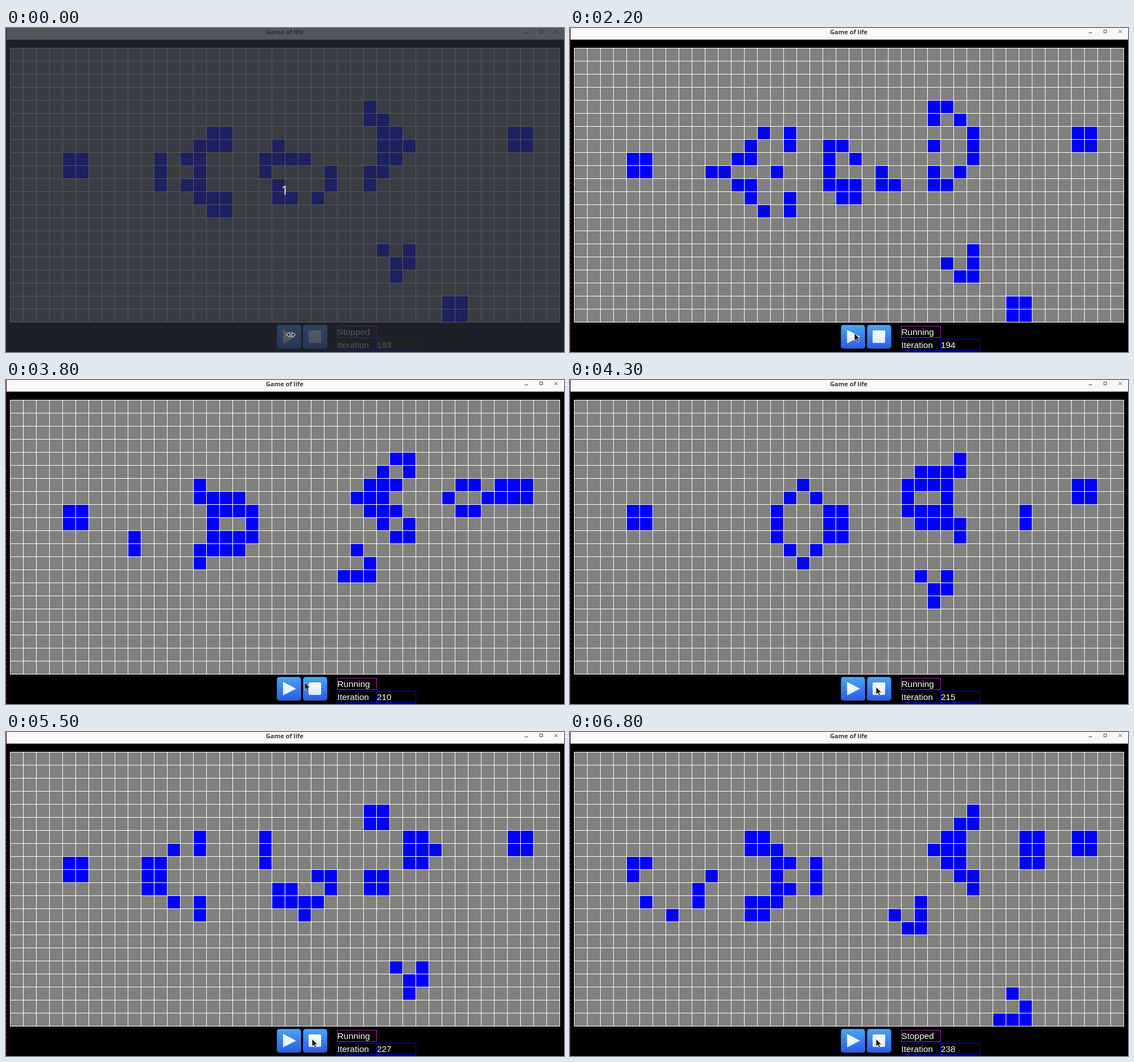
Write an HTML page that moves like this. It is 981x571 px and loops after 7.5 s.

```html
<!DOCTYPE html>
<html lang="en">
<head>
<meta charset="utf-8">
<title>Game of life</title>
<style>
  html, body { margin: 0; width: 100%; height: 100%; overflow: hidden; background: #000; }
  svg { display: block; width: 981px; height: 571px; }
  .title { font: bold 11px "Open Sans", "Noto Sans", sans-serif; fill: #3c3b37; text-anchor: middle; }
  .label { font: 15.4px "Liberation Sans", Arial, sans-serif; fill: #fff; }
  .count { font: 22px "Open Sans", "Noto Sans", sans-serif; fill: #fff; text-anchor: middle; }
  .box { fill: none; stroke: #00f; }
  .icon { fill: none; stroke: #4a4a48; }
</style>
</head>
<body>
<svg viewBox="0 0 981 571">
  <defs>
    <linearGradient id="btn" x1="0" y1="0" x2="0" y2="1">
      <stop offset="0" stop-color="#4aa6f2"/>
      <stop offset=".5" stop-color="#3a80ee"/>
      <stop offset="1" stop-color="#2a5ce6"/>
    </linearGradient>
    <linearGradient id="face" x1="0" y1="0" x2="0" y2="1">
      <stop offset="0" stop-color="#fff"/>
      <stop offset="1" stop-color="#dbe6fb"/>
    </linearGradient>
  </defs>

  <rect width="981" height="571"/>
  <rect width="981" height="20.5" fill="#f9f8f6"/>
  <path d="M.5 0V571" stroke="#2c0a24"/>
  <path d="M.5 160V571" stroke="#6b5566" stroke-dasharray="2 6"/>
  <text class="title" x="490" y="10.5">Game of life</text>
  <path class="icon" d="M912 8.5h6M938.5 3.5h5v5h-5zM964.5 3.5l5.5 5.5M970 3.5l-5.5 5.5"/>

  <rect x="7" y="35" width="967" height="484" fill="#80807e"/>
  <path id="cells" fill="#00f"/>
  <path id="lines" fill="none" stroke="#fff"/>

  <g fill="url(#btn)" stroke="#2b62c4">
    <rect x="476.5" y="523.5" width="42" height="41" rx="4"/>
    <rect x="522.5" y="523.5" width="42" height="41" rx="4"/>
  </g>
  <g fill="url(#face)">
    <path d="M487 532L510 544L487 556Z"/>
    <rect x="532" y="533" width="22" height="22" rx="1.5"/>
  </g>

  <rect class="box" x="582.5" y="525.5" width="69" height="20" style="stroke:#b41eb4"/>
  <path class="box" d="M582.5 548.5h138v20h-138zM651.5 548.5v20"/>
  <text class="label" id="status" x="582.5" y="541"></text>
  <text class="label" x="582.5" y="564">Iteration</text>
  <text class="label" id="iter" x="652" y="564"></text>

  <path id="arrow" d="M0 0V13.2L3.1 10.4L5.3 15.4L7.6 14.4L5.4 9.6H9.6Z" fill="#1a1a1a" stroke="#fff" stroke-width=".7"/>

  <g id="veil">
    <rect width="981" height="571" fill="#262b32" fill-opacity=".78"/>
    <text class="count" x="490" y="294">1</text>
    <path d="M499 536.5L492.5 540.5L499 544.5ZM502.5 536.5L509 540.5L502.5 544.5Z" fill="#222" stroke="#fff"/>
  </g>
</svg>
<script>
const LOOP = 7500, TICK = 100;
const COLS = 42, ROWS = 21, PITCH = 23, LEFT = 8, TOP = 36;
const FIRST = 193, LAST = 238;

// live columns per row at the first iteration
const START = {
  4: [27],
  5: [27, 28],
  6: [15, 16, 28, 29, 38, 39],
  7: [14, 15, 16, 20, 28, 29, 30, 38, 39],
  8: [4, 5, 11, 13, 14, 19, 20, 21, 22, 28, 29],
  9: [4, 5, 11, 14, 19, 24, 27, 28],
  10: [11, 13, 14, 20, 24, 27],
  11: [14, 15, 16, 20, 21, 23],
  12: [15, 16],
  15: [28, 30],
  16: [29, 30],
  17: [29],
  19: [33, 34],
  20: [33, 34]
};

// pointer stops: time, x, y
const POINTER = [[3500, 500, 538], [3800, 525, 533], [4100, 538, 541]];

const el = id => document.getElementById(id);
const clamp = (v, lo, hi) => Math.min(hi, Math.max(lo, v));

const makeGrid = rule => Array.from({ length: ROWS }, (_, r) =>
  Array.from({ length: COLS }, (_, c) => rule(r, c) ? 1 : 0));

// cells beyond the border are dead
function evolve(grid) {
  return makeGrid((r, c) => {
    let sum = 0;
    for (let y = r - 1; y <= r + 1; y++)
      for (let x = c - 1; x <= c + 1; x++) sum += grid[y]?.[x] || 0;
    return sum === 3 || (sum === 4 && grid[r][c]);
  });
}

function toPath(grid) {
  let d = "";
  grid.forEach((row, r) => row.forEach((on, c) => {
    if (on) d += `M${LEFT + c * PITCH} ${TOP + r * PITCH}h22v22h-22z`;
  }));
  return d;
}

function gridLines() {
  let d = "";
  for (let c = 0; c <= COLS; c++) d += `M${LEFT - 0.5 + c * PITCH} ${TOP - 1}v${ROWS * PITCH + 1}`;
  for (let r = 0; r <= ROWS; r++) d += `M${LEFT - 1} ${TOP - 0.5 + r * PITCH}h${COLS * PITCH + 1}`;
  return d;
}

const paths = [];
let grid = makeGrid((r, c) => START[r]?.includes(c));
for (let i = FIRST; i <= LAST; i++) {
  paths.push(toPath(grid));
  grid = evolve(grid);
}

// one generation per tick, with two short hitches
function generation(tick) {
  if (tick === 54) tick = 53;
  if (tick >= 57) tick--;
  return clamp(tick - 21, 0, LAST - FIRST);
}

function pointerAt(t) {
  let [, x, y] = POINTER[0];
  for (let i = 1; i < POINTER.length; i++) {
    const [t0, x0, y0] = POINTER[i - 1], [t1, x1, y1] = POINTER[i];
    if (t < t0) break;
    const k = clamp((t - t0) / (t1 - t0), 0, 1);
    x = x0 + (x1 - x0) * k;
    y = y0 + (y1 - y0) * k;
  }
  return [x, y];
}

const cells = el("cells"), status = el("status"), iter = el("iter");
const arrow = el("arrow"), veil = el("veil");
el("lines").setAttribute("d", gridLines());

let shown = -1;
function draw(now) {
  const tick = Math.floor((now % LOOP) / TICK);
  if (tick !== shown) {
    shown = tick;
    const gen = generation(tick);
    cells.setAttribute("d", paths[gen]);
    iter.textContent = FIRST + gen;
    status.textContent = tick >= 22 && tick < 68 ? "Running" : "Stopped";
    arrow.setAttribute("transform", `translate(${pointerAt(tick * TICK)})`);
    arrow.style.display = tick ? "" : "none";
    veil.style.display = tick ? "none" : "";
  }
}

let begin;
function loop(now) {
  begin ??= now;
  draw(now - begin);
  requestAnimationFrame(loop);
}
draw(0);
requestAnimationFrame(loop);
</script>
</body>
</html>
```
